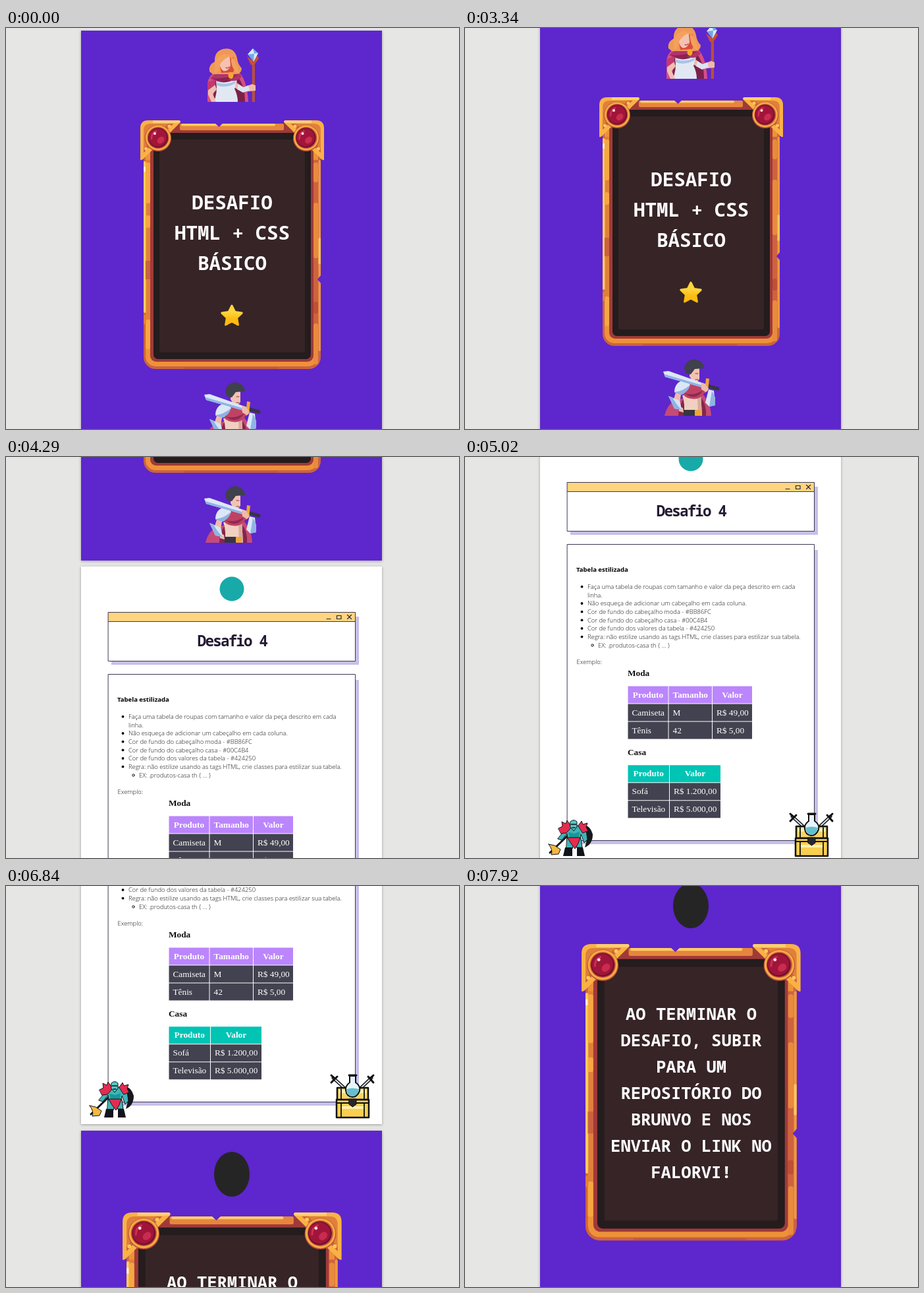
Animation of 688 by 608 pixels, one loop 7.99 s. Source, as an HTML page with a canvas:

```html
<!DOCTYPE html>
<html lang="pt-BR">
<head>
<meta charset="utf-8">
<title>Desafio HTML + CSS</title>
<style>
html, body { margin: 0; width: 100%; height: 100%; overflow: hidden; background: #e6e6e4; }
canvas { display: block; }
</style>
</head>
<body>
<canvas id="stage" width="688" height="608"></canvas>
<script>
const ctx = document.getElementById('stage').getContext('2d');
const LOOP = 7990;
const PURPLE = '#5e26cd';
const PIXEL = '"Noto Sans Mono", monospace';
const SANS = '"Open Sans", sans-serif';
const SERIF = '"Liberation Serif", serif';

// Each scroll burst: first step, last step, number of steps, from, to, easing power
const SCROLLS = [
  [3340, 4290, 15, 0, 493, 1.07],
  [4550, 5020, 7, 493, 690, 1.3],
  [6430, 7180, 12, 690, 1085, 1.177],
  [7310, 7920, 10, 1085, 1351, 1.85]
];

function scrollAt(t) {
  let y = 0;
  for (const [start, end, steps, from, to, power] of SCROLLS) {
    if (t < start) break;
    const step = Math.floor((t - start) / (end - start) * (steps - 1) + 0.001) + 1;
    const p = Math.min(1, step / steps);
    y = from + (to - from) * (1 - Math.pow(1 - p, power));
  }
  return Math.round(y);
}

function box(color, x, y, w, h, r = 0) {
  ctx.fillStyle = color;
  ctx.beginPath();
  ctx.roundRect(x, y, w, h, r);
  ctx.fill();
}

function shape(color, d, line, width = 1) {
  const path = new Path2D(d);
  if (color) {
    ctx.fillStyle = color;
    ctx.fill(path);
  }
  if (line) {
    ctx.strokeStyle = line;
    ctx.lineWidth = width;
    ctx.lineJoin = ctx.lineCap = 'round';
    ctx.stroke(path);
  }
}

function oval(color, x, y, rx, ry = rx, turn = 0) {
  ctx.fillStyle = color;
  ctx.beginPath();
  ctx.ellipse(x, y, rx, ry, turn, 0, 7);
  ctx.fill();
}

function text(str, x, y, font, color, align = 'left', spacing = 0) {
  ctx.font = font;
  ctx.fillStyle = color;
  ctx.textAlign = align;
  ctx.letterSpacing = spacing + 'px';
  ctx.fillText(str, x, y);
}

function at(x, y, draw, scale = 1) {
  ctx.save();
  ctx.translate(x, y);
  ctx.scale(scale, scale);
  draw();
  ctx.restore();
}

function page(y, color) {
  ctx.save();
  ctx.shadowColor = 'rgba(0,0,0,.32)';
  ctx.shadowBlur = 4;
  ctx.shadowOffsetY = 1;
  box(color, 114, y, 457, 646);
  ctx.restore();
}

function corner() {
  shape('#f9b245', 'M-5 60 V12 Q-5 0 7 0 H54 Q57 1 55 4 L-1 59 Q-4 61 -5 60Z');
  shape('#ffd06c', 'M14 0 H54 Q57 1 55 4 H14Z');
  shape('#e0803b', 'M0 49 V15 Q0 5 10 5 H46Z');
  shape('#cd633f', 'M9 40 L38 11 L45 5 H38 L0 43 V49Z');
  oval('#ffc75a', 39, 9, 2.5);
  oval('#ffc75a', 3.5, 43, 2.5);
  oval('#c0523c', 22, 27, 20);
  oval('#f7ad43', 22, 26.5, 19);
  oval('#c75d35', 22, 26.5, 16.5);
}

function gem(x) {
  oval('#76102f', x, 26.5, 15.2);
  oval('#a1153a', x - 0.5, 26, 13.5);
  oval('#c92c50', x + 4, 30, 6, 4.5, -0.7);
  shape(null, `M${x - 10} 28 Q${x - 10} 19 ${x - 3} 16.5`, '#cc3156', 2.5);
  oval('#ffe7e7', x - 5, 20, 2);
}

// Ornate card, origin at its top left
function card() {
  box('#cd633f', 0, 5, 269, 372, 18);
  box('#ee9239', 3, 8, 262, 365, 15);
  box('#cd633f', 258, 60, 11, 300);
  box('#ef9740', 265.5, 60, 3.5, 290, 2);
  box('#e0803b', 3, 60, 7, 285);
  box('#ffca62', 0, 62, 3.5, 230, 2);
  box('#fff4d4', 0, 70, 3.5, 8, 2);
  for (const [y, h] of [[64, 62], [144, 19], [302, 45]]) box('#f6a740', 3, y, 7, h, 3);
  box('#cb6140', 3, 213, 7, 28);
  box('#e0803b', 0, 295, 3.5, 14);
  for (const [y, h] of [[64, 30], [125, 84], [308, 62]]) box('#e98b3d', 258, y, 7, h, 3);
  box('#bd5038', 258, 275, 7, 18, 3);
  box('#ffc75a', 265.5, 178, 3.5, 40, 2);
  shape(null, 'M62 375.5 H204', '#bf5738', 2);
  box('#a03a39', 10, 15, 248, 351, 9);
  box('#a03a39', 38, 5, 194, 14);
  box('#e6863c', 55, 5, 158, 10, 2);
  box('#ffcb65', 57, 5, 143, 3.5, 2);
  box('#241c1d', 15, 19, 239, 343, 7);
  box('#362426', 24, 29, 221, 323, 2);
  shape(PURPLE, 'M108 4 H121 L114.5 10Z M270 234 L264 241 L270 248Z');
  corner();
  ctx.save();
  ctx.translate(269, 0);
  ctx.scale(-1, 1);
  corner();
  ctx.restore();
  gem(22);
  gem(246.5);
}

function star(x, y) {
  const ring = (r, k) => {
    let d = '';
    for (let i = 0; i < 10; i++) {
      const a = -Math.PI / 2 + i * Math.PI / 5;
      const q = i % 2 ? r * k : r;
      d += (i ? 'L' : 'M') + (x + q * Math.cos(a)) + ' ' + (y + q * Math.sin(a));
    }
    return d + 'Z';
  };
  const g = ctx.createLinearGradient(0, y - 18, 0, y + 16);
  g.addColorStop(0.35, '#ffd53c');
  g.addColorStop(0.65, '#fdbb12');
  shape(g, ring(16, 0.5), g, 3);
}

function mage() {
  shape('#d64f84', 'M306 112 V84 Q309 66 328 64 H350 Q366 74 368 112Z');
  shape('#7b2149', 'M318 78 L352 74 Q363 88 363 112 H314Z');
  shape('#e1e8f2', 'M319 80 Q333 86 350 77 Q352 86 347 92 Q352 102 352 112 H315 Q322 100 319 80Z');
  shape('#abc3e6', 'M319 82 Q333 88 349 80 L348 84 Q334 92 320 87Z');
  shape('#f0beb0', 'M307 83 L316 82 L320 93 L314 100 L319 112 H312 L307 101Z');
  shape('#c5386f', 'M306 82 L316 79 L318 86 L306 95Z');
  shape('#b0346b', 'M310 76 Q320 64 340 67 Q353 66 358 73 Q353 83 336 79 Q320 84 310 76Z');
  shape('#8b2350', 'M312 76 Q330 78 352 70 Q340 82 322 80Z');
  shape('#ef9957', 'M309 66 Q307 56 317 51 Q316 36 329 32 Q347 28 351 46 Q352 55 358 61 Q358 70 347 70 H314Z');
  shape('#d94c3c', 'M323 48 L345 44 Q350 58 345 67 L327 68Z');
  shape('#f5c2b1', 'M324 45 Q332 36 340 45 L341 57 Q337 67 330 65 Q323 60 324 45Z');
  shape('#f3a15d', 'M317 52 Q324 36 342 42 Q331 45 324 57 Q325 66 317 69Z M342 42 Q352 54 354 70 Q340 62 342 42Z');
  shape(null, 'M334 60 Q336 62 339 59', '#bd4250', 1.2);
  oval('#f6a928', 341.5, 72, 4, 5);
  box('#b5513d', 373.7, 51, 4.3, 61);
  shape('#c94e39', 'M366 43 L374 49 L381 41 L384 46 L377 56 H372Z');
  shape('#73a8ec', 'M375 31 L383 38 L376 51 L367 40Z');
  shape('#d5eefb', 'M375 31 L377 39 L367 40Z M377 39 L383 38 L376 51Z');
  shape('#efbaa9', 'M349 82 L360 90 L374 85 L379 87 V95 L360 97 L348 91Z');
  shape('#dce6f3', 'M353 85 L361 90 L368 87 L370 94 L360 98 L351 93Z');
}

function knight() {
  shape('#c44b78', 'M303 588 Q308 566 326 563 L358 552 Q373 566 374 588Z');
  shape('#842649', 'M324 588 Q324 572 334 560 L358 560 Q367 570 366 588Z');
  shape('#f0d0c0', 'M330 557 L358 554 L360 588 H332 Q335 571 330 557Z');
  shape('#d9ac9f', 'M353 559 L358 554 L360 588 H354Z');
  shape('#bf4265', 'M328 551 Q336 535 352 538 L366 548 Q360 565 343 562 Q333 561 328 551Z');
  shape('#8f2a50', 'M330 552 Q344 560 362 549 Q353 563 340 558Z');
  shape('#dce7f6', 'M318 552 Q318 537 334 533 L342 541 Q338 553 326 557Z');
  shape('#8eb2e3', 'M318 552 Q331 551 342 541 Q338 553 326 557Z');
  shape('#efbbaa', 'M320 553 L328 556 L326 568 L316 566Z M325 574 L331 576 L332 583 L325 581Z');
  shape('#d6e4f6', 'M309 558 L326 565 Q328 572 329 579 L318 577Z');
  shape('#8fb3e4', 'M309 558 L315 560 Q320 570 329 579 L318 577Z');
  box('#363640', 332, 579, 18, 9);
  box('#f0a538', 349, 579, 9, 9, 1);
  shape('#f2c3b2', 'M342 516 H356 V532 Q352 539 346 536 L341 528Z');
  shape('#3f414c', 'M333 517 Q334 504 348 502 Q362 504 363 516 L349 517 L343 525 L336 524Z');
  shape(null, 'M350 524 H354 M350 533 H354', '#7b4142', 1.2);
  shape('#dce7f6', 'M301 521 L309 520 L366 540 L364 546 L304 529Z');
  shape('#8fb3e4', 'M303 525 L365 543 L364 546 L304 529Z');
  shape(null, 'M370 543 L384 547', '#363640', 5);
  shape('#f0a538', 'M366 531 L371 532 L369 550 L364 553Z');
  shape('#efbbaa', 'M358 538 L364 539 L370 547 L366 552 L359 548Z');
  shape('#dce7f6', 'M370 548 L378 550 L380 572 L371 574 L365 568Z');
  shape('#8fb3e4', 'M375 550 L380 560 V572 L371 574Z');
}

function brute() {
  const ink = '#10151b';
  shape('#17191f', 'M181 559 Q190 558 194 572 Q194 587 182 592 Q188 575 181 559Z');
  shape(null, 'M129 600 L157 573', ink, 3);
  shape('#f4b83e', 'M127 587 L136 589 L145 595 L142 602 L131 603 Q134 596 127 587Z', ink);
  shape('#3eb5b6', 'M152 565 L160 559 H176 L184 566 L186 580 L181 585 L176 572 L175 580 H156 L155 571 L147 581 L141 579Z', ink);
  shape('#3eb5b6', 'M155 578 H176 L178 592 H169 L166 584 L163 594 H154Z', ink);
  shape('#16989b', 'M157 569 L166 571 L174 568 L173 577 H159Z');
  shape('#e72a50', 'M142 563 L148 560 L147 553 L153 556 L155 551 L162 561 L154 570 L146 571Z', ink);
  shape('#e72a50', 'M172 559 L177 552 L179 557 L186 555 L184 561 L187 567 L179 570Z', ink);
  shape('#e72a50', 'M156 577 H175 L172 586 L167 594 L161 586Z', ink);
  shape('#56c7c4', 'M160 553 Q165 548 170 553 V561 L165 567 L160 561Z', ink);
  shape(null, 'M161 557 H169 M163 562 H167', ink, 1.3);
  shape(ink, 'M152 592 H163 V605 H149Z M170 592 H179 L182 605 H170Z');
}

function chest() {
  const ink = '#101010';
  const sword = d => {
    shape(null, d, ink, 5);
    shape(null, d, '#d7e5f4', 2);
  };
  sword('M497 545 L519 565');
  sword('M555 545 L534 565');
  shape(null, 'M494 552 L503 543 M550 543 L558 552 M494 541 L498 545 M558 541 L554 545', ink, 3);
  shape('#f7d567', 'M503 560 H550 V578 H503Z', ink, 2.5);
  shape('#f9cf51', 'M502 578 H551 V605 H502Z', ink, 2.5);
  shape('#fff0ae', 'M506 563 H547 V568 H506Z M508 588 H545 V592 H508Z');
  shape(null, 'M502 583 H551 M509 562 V577 M544 562 V577 M509 583 V604 M544 583 V604', ink, 1.8);
  shape('#27262c', 'M521 577 H532 V585 L526.5 589 L521 585Z', ink);
  shape('#e7f5fb', 'M522 542 H531 V552 Q539 557 537 565 Q533 574 526 574 Q517 573 516 564 Q515 557 522 552Z', ink, 2);
  shape('#63bfd0', 'M517 562 Q526 559 536 562 Q535 572 526 573 Q518 572 517 562Z');
  shape(null, 'M521 541 H532', ink, 3);
}

function panel(y, h, drop) {
  box('#c8bfe8', 160, y + drop, 376, h - drop + 5);
  box('#fff', 155, y, 376, h);
}

function outline(y, h) {
  ctx.strokeStyle = '#3d3953';
  ctx.lineWidth = 1;
  ctx.strokeRect(155.5, y + 0.5, 375, h - 1);
}

function table(edges, y, color, rows) {
  rows.forEach((row, r) => row.forEach((value, i) => {
    const x = edges[i], w = edges[i + 1] - x - 1, top = y + r * 27;
    box(r ? '#424250' : color, x, top, w, 26);
    if (r) text(value, x + 6, top + 17, '13.3px ' + SERIF, '#fff');
    else text(value, x + w / 2, top + 17, 'bold 13.3px ' + SERIF, '#fff', 'center');
  }));
}

function lesson() {
  oval('#18aaa9', 343, 3, 18.5);
  panel(38, 75, 7);
  box('#ffd580', 155, 38, 376, 14);
  outline(38, 75);
  shape(null, 'M155.5 52.5 H530.5', '#3d3953');
  shape(null, 'M487 48.5 H493 M502.5 43.5 H509 V48.5 H502.5Z M518.5 42.5 L524.5 48.5 M524.5 42.5 L518.5 48.5', '#282438', 1.2);
  text('Desafio 4', 343.5, 90, 'bold 22.5px ' + PIXEL, '#251b33', 'center', -1.8);

  panel(132, 450, 9);
  outline(132, 450);
  text('Tabela estilizada', 169, 174, 'bold 9.55px ' + SANS, '#000');
  const body = '300 9.4px ' + SANS;
  const lines = [
    'Faça uma tabela de roupas com tamanho e valor da peça descrito em cada',
    'linha.',
    'Não esqueça de adicionar um cabeçalho em cada coluna.',
    'Cor de fundo do cabeçalho moda - #BB86FC',
    'Cor de fundo do cabeçalho casa - #00C4B4',
    'Cor de fundo dos valores da tabela - #424250',
    'Regra: não estilize usando as tags HTML, crie classes para estilizar sua tabela.'
  ];
  lines.forEach((line, i) => {
    const y = 200 + i * 12.65;
    if (i !== 1) oval('#000', 177.5, y - 3.3, 1.9);
    text(line, 186, y, body, '#111');
  });
  ctx.strokeStyle = '#000';
  ctx.beginPath();
  ctx.arc(193.5, 285.5, 1.7, 0, 7);
  ctx.stroke();
  text('EX: .produtos-casa th { ... }', 202, 288.7, body, '#111');
  text('Exemplo:', 169.5, 314, body, '#111');

  text('Moda', 247, 332, 'bold 13.3px ' + SERIF, '#111');
  table([247.5, 309.5, 376, 437], 347.5, '#bb86fc', [
    ['Produto', 'Tamanho', 'Valor'],
    ['Camiseta', 'M', 'R$ 49,00'],
    ['Tênis', '42', 'R$ 5,00']
  ]);
  text('Casa', 247, 452, 'bold 13.3px ' + SERIF, '#111');
  table([247.5, 311, 389], 467.3, '#00c4b4', [
    ['Produto', 'Valor'],
    ['Sofá', 'R$ 1.200,00'],
    ['Televisão', 'R$ 5.000,00']
  ]);
  brute();
  chest();
}

function title(lines, y, pitch, size) {
  lines.forEach((line, i) =>
    text(line, 343.5, y + i * pitch, `600 ${size}px ${PIXEL}`, '#fff', 'center'));
}

function render(t) {
  box('#e6e6e4', 0, 0, 688, 608);
  at(0, -scrollAt(t), () => {
    page(4, PURPLE);
    mage();
    at(209, 140, card);
    title(['DESAFIO', 'HTML + CSS', 'BÁSICO'], 275, 46, 29.2);
    star(343, 437);
    at(0, 35, knight);

    page(659, '#fff');
    at(0, 690, lesson);

    page(1315, PURPLE);
    oval('#252525', 343, 1381, 27, 34);
    at(183, 1439, card, 1.192);
    title(['AO TERMINAR O', 'DESAFIO, SUBIR', 'PARA UM', 'REPOSITÓRIO DO',
      'BRUNVO E NOS', 'ENVIAR O LINK NO', 'FALORVI!'], 1554, 40, 25.5);
  });
}

const began = performance.now();
function tick() {
  render((performance.now() - began) % LOOP);
  requestAnimationFrame(tick);
}
tick();
</script>
</body>
</html>
```
